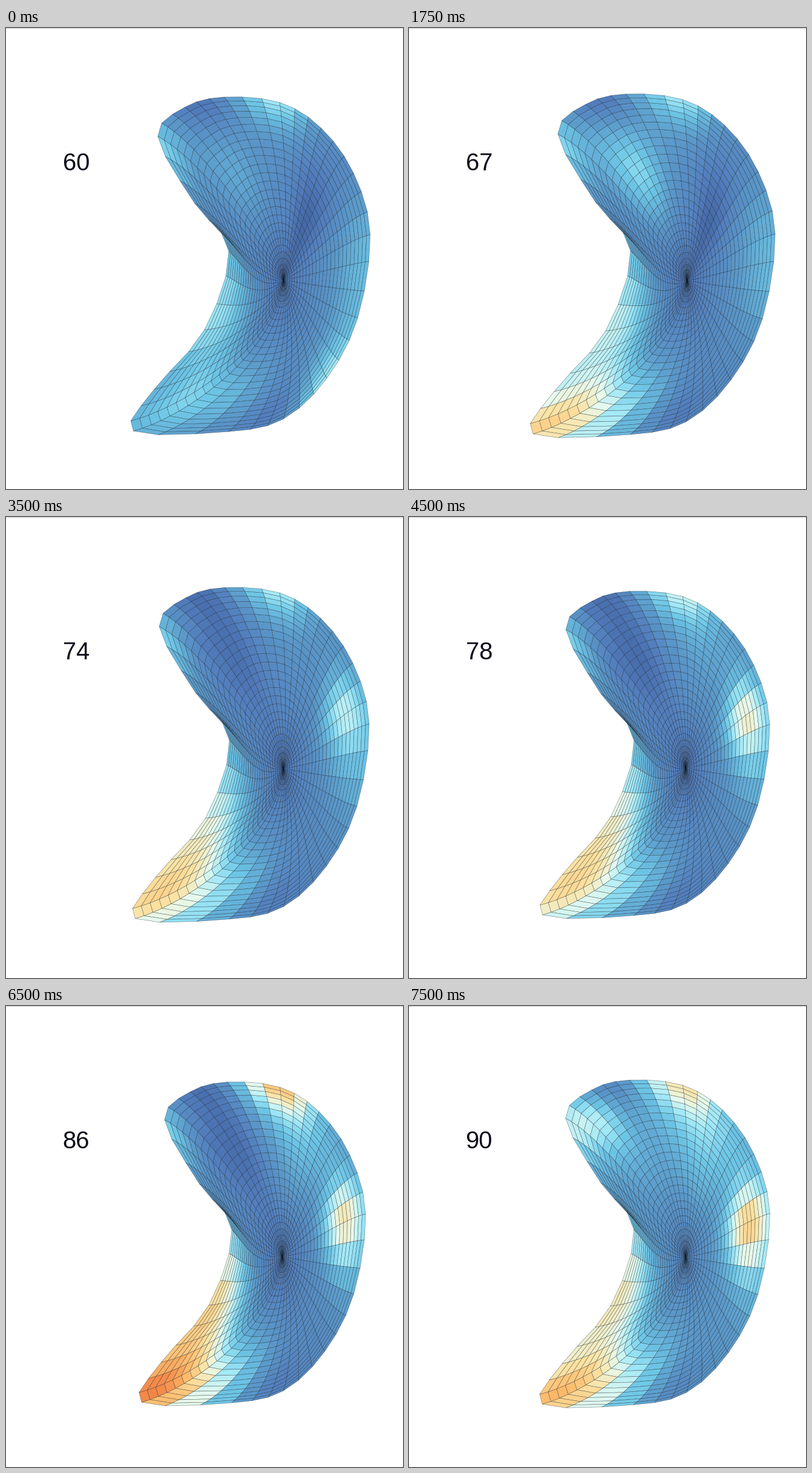
Animation of 656 by 761 pixels, one loop 7.75 s. Source, as a matplotlib script:

```python
import numpy as np
import matplotlib.pyplot as plt
from matplotlib.animation import FuncAnimation
from matplotlib.collections import PolyCollection
from matplotlib.colors import LinearSegmentedColormap
from matplotlib.patches import Rectangle

W, H, DPI = 656, 761, 64
PT = 72 / DPI
FRAMES, STEP_MS = 31, 250
SPLIT, RINGS = 3, 27

# Key points of the rim, clockwise from the top; every third ray ends on one.
RIM = np.array([
    (358, 109), (452, 118), (522, 161), (577, 237), (605, 340), (584, 480),
    (532, 581), (458, 650), (365, 671), (205, 670), (240, 600), (325, 500),
    (366, 368), (308, 287), (246, 175), (292, 126)], float)
RAYS = SPLIT * len(RIM)
HUB = np.array([459.5, 417])

SHADES = [
    (0, '#3a5c9a'), (.15, '#527cbc'), (.3, '#5b9aca'), (.45, '#6dc6e6'),
    (.55, '#a0e8f7'), (.65, '#e6faee'), (.75, '#fbe2a2'), (.85, '#fdb969'),
    (.93, '#f38748'), (1, '#d2462a')]
CMAP = LinearSegmentedColormap.from_list('bend', SHADES, N=512)


def ease(x, start, end):
    x = np.clip((x - start) / (end - start), 0, 1)
    return x * x * (3 - 2 * x)


def closed_spline(keys):
    """Catmull-Rom through the keys, SPLIT steps between neighbours."""
    t = np.arange(SPLIT)[None, :, None] / SPLIT
    p, q = keys[:, None], np.roll(keys, -1, axis=0)[:, None]
    slope = (np.roll(keys, -1, axis=0) - np.roll(keys, 1, axis=0)) / 2
    m, n = slope[:, None], np.roll(slope, -1, axis=0)[:, None]
    curve = ((1 + 2 * t) * (1 - t) ** 2 * p + t * (1 - t) ** 2 * m
             + t * t * (3 - 2 * t) * q + t * t * (t - 1) * n)
    return curve.reshape(-1, 2)


def mesh(i):
    """Rays leave the hub as a tall ellipse and bend towards the rim."""
    tight = .3 * (1 - ease(i, 0, 1)) + ease(i, 7, 22) - .2 * ease(i, 26, 30)
    pivot = np.array([460, 395])
    rim = pivot + (closed_spline(RIM) - pivot) * (1 - tight * np.array([.075, .058]))
    hub = HUB - 3 * tight
    ang = (np.arange(RAYS) - 13.5) * 2 * np.pi / RAYS
    inner = hub + np.column_stack([45 * np.cos(ang), 115 * np.sin(ang)])
    outer = rim + (inner - rim) * [.4, .2]
    t = np.linspace(0, 1, RINGS + 1)[None, :, None] ** 1.35
    a, b, c = inner[:, None], outer[:, None], rim[:, None]
    return ((1 - t) ** 3 * hub + 3 * t * (1 - t) ** 2 * a
            + 3 * t ** 2 * (1 - t) * b + t ** 3 * c)


def cells(i):
    p = mesh(i)
    q = np.roll(p, -1, axis=0)
    quads = np.stack([p[:, :-1], p[:, 1:], q[:, 1:], q[:, :-1]], axis=2)
    return quads.reshape(-1, 4, 2)


def spot(ray, ring, ray_spread, ring_spread):
    """Soft bump on the grid; ring runs from 0 at the hub to 1 at the rim."""
    k = np.arange(RAYS)[:, None] + .5
    s = (np.arange(RINGS)[None, :] + .5) / RINGS
    d = (k - ray + RAYS / 2) % RAYS - RAYS / 2
    return np.exp(-((d / ray_spread) ** 2 + ((s - ring) / ring_spread) ** 2) / 2)


def bend(i):
    p = i / (FRAMES - 1)
    last = ease(p, .87, 1)
    flare = ease(p, .7, .87) - last
    early = 1 - ease(p, 0, .25)
    level = .23 + .06 * last - .1 * spot(0, 0, RAYS, .25)
    # tail: inner edge, tip, upper edge and the cyan belt beside it
    level += spot(30, 1, 3.3, .27) * (.06 + .34 * ease(p, 0, .5) + .06 * p - .2 * last)
    level += spot(27, 1, 1.8, .2) * (.08 + .27 * (1 - early) - .25 * ease(p, .25, .55)
                                     + .22 * ease(p, .7, .87))
    level += spot(34, 1, 2, .25) * (.12 + .15 * abs(np.cos(np.pi * p)))
    level += spot(28, .72, 3.5, .16) * .2
    # lower and right rim
    level += spot(18, 1, 1.8, .18) * .32 * early
    level -= spot(22.5, .85, 1.8, .15) * .12
    level += spot(13, 1, 2, .25) * .18
    # pale patch drifting down the right side, dark ridge before it
    level += spot(9.5 + 2.5 * p, .77, 1.6, .15) * .38 * ease(p, .15, .6)
    level -= spot(7.5, .5, 2, .2) * .15 * (1 - ease(p, .2, .5))
    # top: bright rim, growing cyan field, dark edge, ear and hollow
    level += spot(2.8, 1, 1.7, .14) * (.32 + .15 * flare)
    level += spot(5, .8, 3, .25) * .22 * ease(p, .35, .85)
    level -= spot(46, 1, 1.5, .15) * .13
    level += spot(41.5, 1, 1.2, .12) * .25
    hollow = .28 * ease(p, -.2, .23) - .42 * ease(p, .23, .5) + .2 * last
    level += spot(45, .65, 2.3, .17) * hollow
    level += spot(43.5, .85, 1.5, .12) * .25 * last
    return level.ravel()


fig = plt.figure(figsize=(W / DPI, H / DPI), dpi=DPI, facecolor='white')
ax = fig.add_axes([0, 0, 1, 1])
ax.set_xlim(0, W)
ax.set_ylim(H, 0)
ax.axis('off')
ax.add_patch(Rectangle((0, 0), W, 1, color='#c8c8c8', lw=0))
skin = PolyCollection([], edgecolors=[(.04, .08, .12, .55)],
                      linewidths=.55 * PT)
ax.add_collection(skin, autolim=False)
label = ax.text(93.5, 235, '', fontsize=40 * PT, family='Liberation Sans',
                color='#0a0a18', va='baseline')


def update(frame):
    i = 1 if frame == 2 else frame  # the second picture holds for two steps
    skin.set_verts(cells(i))
    skin.set_facecolor(CMAP(bend(i)))
    label.set_text(str(60 + i))
    return skin, label


anim = FuncAnimation(fig, update, frames=FRAMES, interval=STEP_MS,
                     repeat=True, repeat_delay=0, blit=False)
plt.show()
```
